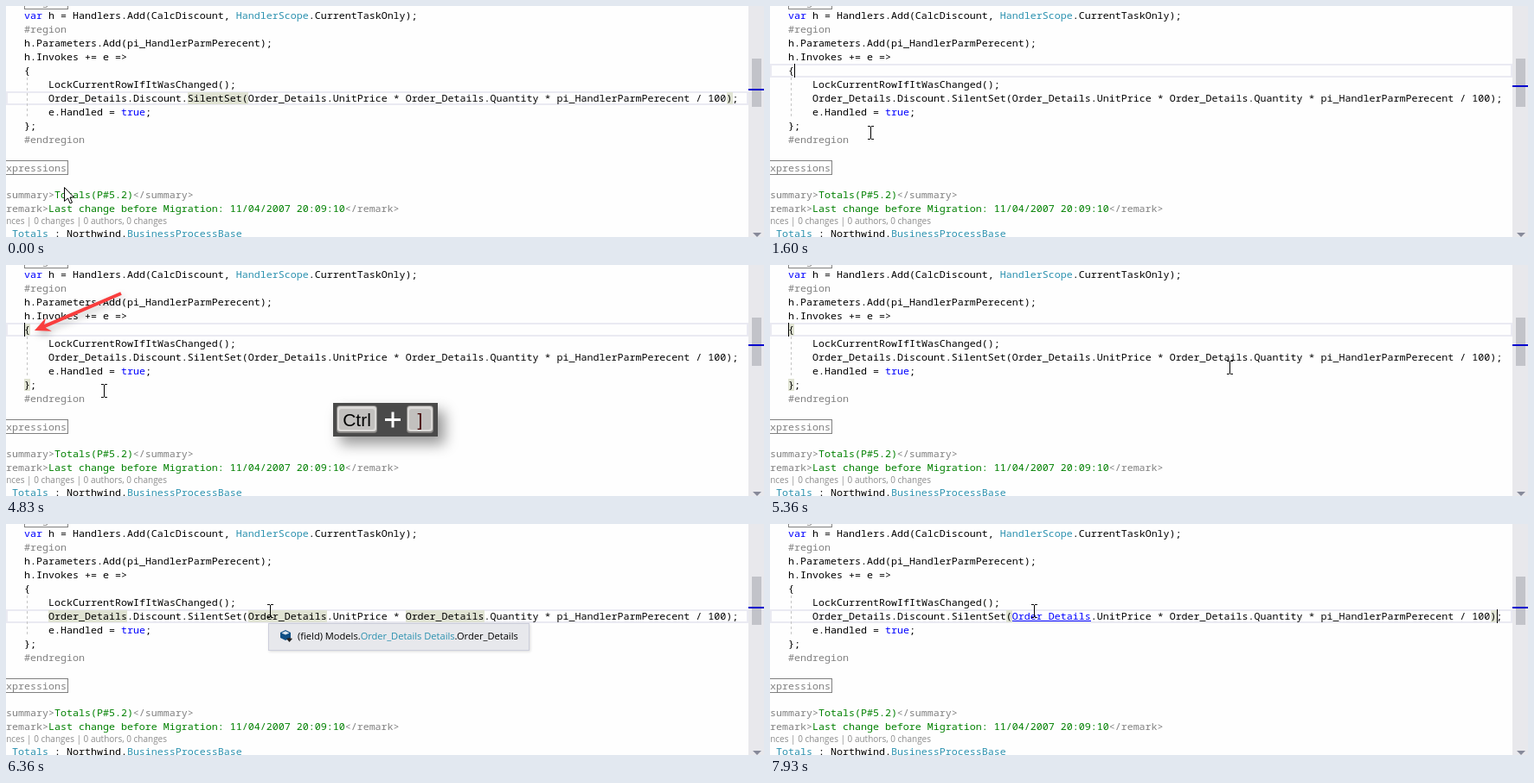
An HTML page with a canvas for the animation above (8000 ms loop, 876 by 268 pixels).

```html
<!DOCTYPE html>
<html lang="en">
<head>
<meta charset="utf-8">
<title>Jumping between matching braces</title>
<style>
html, body { margin: 0; width: 876px; height: 268px; overflow: hidden; background: #fefefe; }
canvas { display: block; }
</style>
</head>
<body>
<canvas id="stage" width="876" height="268"></canvas>
<script>
const ctx = document.getElementById('stage').getContext('2d');
const LOOP = 8000, BLINK = 500;
const MONO = '11.667px "Noto Sans Mono", Consolas, monospace';
const SANS = '"Open Sans", "Segoe UI", sans-serif';
const BLACK = '#000', BLUE = '#0000ff', GRAY = '#808080', TEAL = '#2b91af', GREEN = '#008000';

const rowTop = row => 3 + row * 16;
const colX = col => 21 + col * 7;
const between = (t, a, b) => t >= a && t < b;

function rect(x, y, w, h, color) {
  ctx.fillStyle = color;
  ctx.fillRect(x, y, w, h);
}

function outline(x, y, w, h, color, line = 1) {
  ctx.strokeStyle = color;
  ctx.lineWidth = line;
  ctx.strokeRect(x + line / 2, y + line / 2, w - line, h - line);
}

function roundBox(x, y, w, h, r, fill) {
  ctx.beginPath();
  ctx.roundRect(x, y, w, h, r);
  ctx.fillStyle = fill;
  ctx.fill();
}

function polygon(points, fill) {
  ctx.beginPath();
  points.forEach(([x, y]) => ctx.lineTo(x, y));
  ctx.closePath();
  ctx.fillStyle = fill;
  ctx.fill();
}

function label(s, x, y, color, font, align = 'left') {
  ctx.font = font;
  ctx.textAlign = align;
  ctx.fillStyle = color;
  ctx.fillText(s, x, y);
}

// parts: text, color, text, color, ...
function run(font, x, y, parts) {
  for (let i = 0; i < parts.length; i += 2) {
    label(parts[i], x, y, parts[i + 1], font);
    x += ctx.measureText(parts[i]).width;
  }
}

const code = (x, y, ...parts) => run(MONO, x, y, parts);
const line = (row, col, ...parts) => code(colX(col), rowTop(row) + 12, ...parts);

function withShadow(alpha, blur, dx, dy, paint) {
  ctx.save();
  ctx.shadowColor = `rgba(0,0,0,${alpha})`;
  ctx.shadowBlur = blur;
  ctx.shadowOffsetX = dx;
  ctx.shadowOffsetY = dy;
  paint();
  ctx.restore();
}

function drawCode(link) {
  line(-1, 0, '#region', GRAY);
  outline(21, -13, 51, 17, GRAY);
  line(0, 0, 'var', BLUE, ' h = Handlers.Add(CalcDiscount, ', BLACK, 'HandlerScope', TEAL, '.CurrentTaskOnly);', BLACK);
  line(1, 0, '#region', GRAY);
  line(2, 0, 'h.Parameters.Add(pi_HandlerParmPerecent);', BLACK);
  line(3, 0, 'h.Invokes += e =>', BLACK);
  line(4, 0, '{', BLACK);
  line(5, 4, 'LockCurrentRowIfItWasChanged();', BLACK);
  line(6, 4, 'Order_Details.Discount.SilentSet(', BLACK, 'Order_Details', link ? BLUE : BLACK,
    '.UnitPrice * Order_Details.Quantity * pi_HandlerParmPerecent / 100);', BLACK);
  if (link) rect(colX(37), 112, 91, 1, BLUE);
  line(7, 4, 'e.Handled = ', BLACK, 'true', BLUE, ';', BLACK);
  line(8, 0, '};', BLACK);
  line(9, 0, '#endregion', GRAY);

  code(-7, 192, 'Expressions', GRAY);
  outline(-10, 179, 82, 17, GRAY);
  code(0, 223, 'summary>', GRAY, 'Totals(P#5.2)', GREEN, '</summary>', GRAY);
  code(0, 239, 'remark>', GRAY, 'Last change before Migration: 11/04/2007 20:09:10', GREEN, '</remark>', GRAY);
  label('0 references | 0 changes | 0 authors, 0 changes', 186, 253, '#8c8c8c', '10px ' + SANS, 'right');
  code(7, 268, 'Totals', TEAL, ' : Northwind.', BLACK, 'BusinessProcessBase', TEAL);

  for (let y = 83; y < 131; y += 6) rect(24, y, 1, 3, '#c4c4c4');
}

function drawScrollbar(row) {
  rect(858, 0, 18, 268, '#e8e8ec');
  rect(862, 61, 11, 56, '#c2c3c9');
  rect(858, 84 + row * 2, 18, 2, '#0000cd');
  polygon([[863, 263], [873, 263], [868, 268]], '#868999');
}

function drawKey(s, x, w, color) {
  roundBox(x, 163, w, 32, 4, '#8a8886');
  roundBox(x + 1, 164, w - 2, 29, 3, '#dcdad8');
  roundBox(x + 3, 167, w - 6, 24, 3, '#c2c0be');
  label(s, x + w / 2, 187, color, '21px "Liberation Sans", Arial, sans-serif', 'center');
}

function drawKeys() {
  withShadow(.4, 16, 8, 9, () => rect(378, 160, 121, 39, '#4a4a4a'));
  drawKey('Ctrl', 382, 47, '#000');
  drawKey(']', 463, 31, '#400');
  rect(438, 178, 18, 3, '#fff');
  rect(445.5, 170.5, 3, 18, '#fff');
}

function drawArrow(tipX, tipY, tailX, tailY) {
  const dx = tailX - tipX, dy = tailY - tipY, len = Math.hypot(dx, dy);
  withShadow(.25, 8, 2, 4, () => {
    ctx.translate(tipX, tipY);
    ctx.rotate(Math.atan2(dy, dx));
    polygon([[0, 0], [18, -8.5], [13, -2], [len, -2], [len, 2], [13, 2], [18, 8.5]], '#f93e3e');
  });
}

function drawTooltip() {
  withShadow(.15, 3, 1, 1, () => rect(303, 115, 302, 32, '#e7e8ec'));
  outline(303, 115, 302, 32, '#cccedb');
  polygon([[317, 126], [323, 123], [329, 126], [329, 132], [323, 135], [317, 132]], '#0f4f85');
  polygon([[318.5, 126.4], [323, 124.3], [327.5, 126.4], [323, 128.6]], '#dbe6f0');
  polygon([[324, 133], [327.5, 132], [331, 133], [327.5, 137]], '#222');
  run('11.1px ' + SANS, 337, 134,
    ['(field) Models.', BLACK, 'Order_Details Details', TEAL, '.Order_Details', BLACK]);
}

const MOVES = [
  { from: 260, to: 730, x: 14, y: 88 },
  { from: 730, to: 860, x: 27, y: 77 },
  { from: 1030, to: 1400, x: 116, y: 147 },
  { from: 4800, to: 4830, x: 113, y: 146 },
  { from: 4830, to: 5240, x: 583, y: 122 },
  { from: 5240, to: 5700, x: 282, y: 107 },
  { from: 5830, to: 6080, x: 305, y: 101 }
];

function mouseAt(t) {
  let x = 67, y = 210;
  for (const m of MOVES) {
    const u = Math.min(1, Math.max(0, (t - m.from) / (m.to - m.from)));
    const k = u * u * (3 - 2 * u);
    x += (m.x - x) * k;
    y += (m.y - y) * k;
  }
  return [Math.round(x), Math.round(y)];
}

function drawPointer(x, y) {
  const shape = [[0, 0], [0, 16], [4, 12.5], [6.7, 18.5], [9, 17.5], [6.5, 11.5], [11, 11.5]];
  polygon(shape.map(([dx, dy]) => [x + .5 + dx, y + .5 + dy]), '#fff');
  ctx.strokeStyle = BLACK;
  ctx.lineWidth = 1;
  ctx.stroke();
}

function drawBeam(x, y) {
  rect(x, y - 7, 1, 14, BLACK);
  for (const dy of [-8, 7]) {
    rect(x - 3, y + dy, 3, 1, BLACK);
    rect(x + 1, y + dy, 3, 1, BLACK);
  }
}

const STOPS = [
  { at: 0, row: 6, col: -9 },
  { at: 1040, row: 4, col: 1 },
  { at: 2070, row: 8, col: 1 },
  { at: 3800, row: 4, col: 0 },
  { at: 5700, row: 6, col: 37 },
  { at: 6300, row: 6, col: 37 },
  { at: 6940, row: 6, col: 117 }
];

function drawMarks(t) {
  const mark = (row, col, n = 1) => rect(colX(col), rowTop(row) + 1, n * 7, 14, '#e0e3d3');
  if (t < 1040) mark(6, 27, 9);
  if (!between(t, 1040, 7100)) [36, 116].forEach(col => mark(6, col));
  if (between(t, 2200, 5850)) [4, 8].forEach(row => mark(row, 0));
  if (between(t, 6300, 6940)) [4, 37, 63].forEach(col => mark(6, col, 13));
}

function draw(t) {
  const { at, row, col } = STOPS.filter(s => s.at <= t).pop();
  const selecting = between(t, 5700, 5850);
  const first = between(t, 2030, 3360), second = between(t, 3700, 5030), third = between(t, 6860, 7930);

  rect(0, 0, 876, 268, '#fefefe');
  if (selecting) rect(colX(37), rowTop(6), 7, 16, '#add6ff');
  else outline(0, rowTop(row), 858, 16, '#eaeaf2', 2);
  drawMarks(t);
  drawCode(t >= 6700);

  // the first blink after a jump comes slightly late
  const lit = Math.floor((t - at + 440) / BLINK) % 2 === 0;
  if (lit && !selecting) rect(colX(col), rowTop(row), 1, 16, BLACK);
  drawScrollbar(row);

  if (between(t, 6360, 6940)) drawTooltip();
  if (first) drawArrow(41, 146, 121, 195);
  if (second) drawArrow(33, 76, 133, 33);
  if (first || second || third) drawKeys();
  (t < 400 ? drawPointer : drawBeam)(...mouseAt(t));
}

const start = performance.now();
function tick() {
  draw((performance.now() - start) % LOOP);
  requestAnimationFrame(tick);
}
tick();
</script>
</body>
</html>
```
